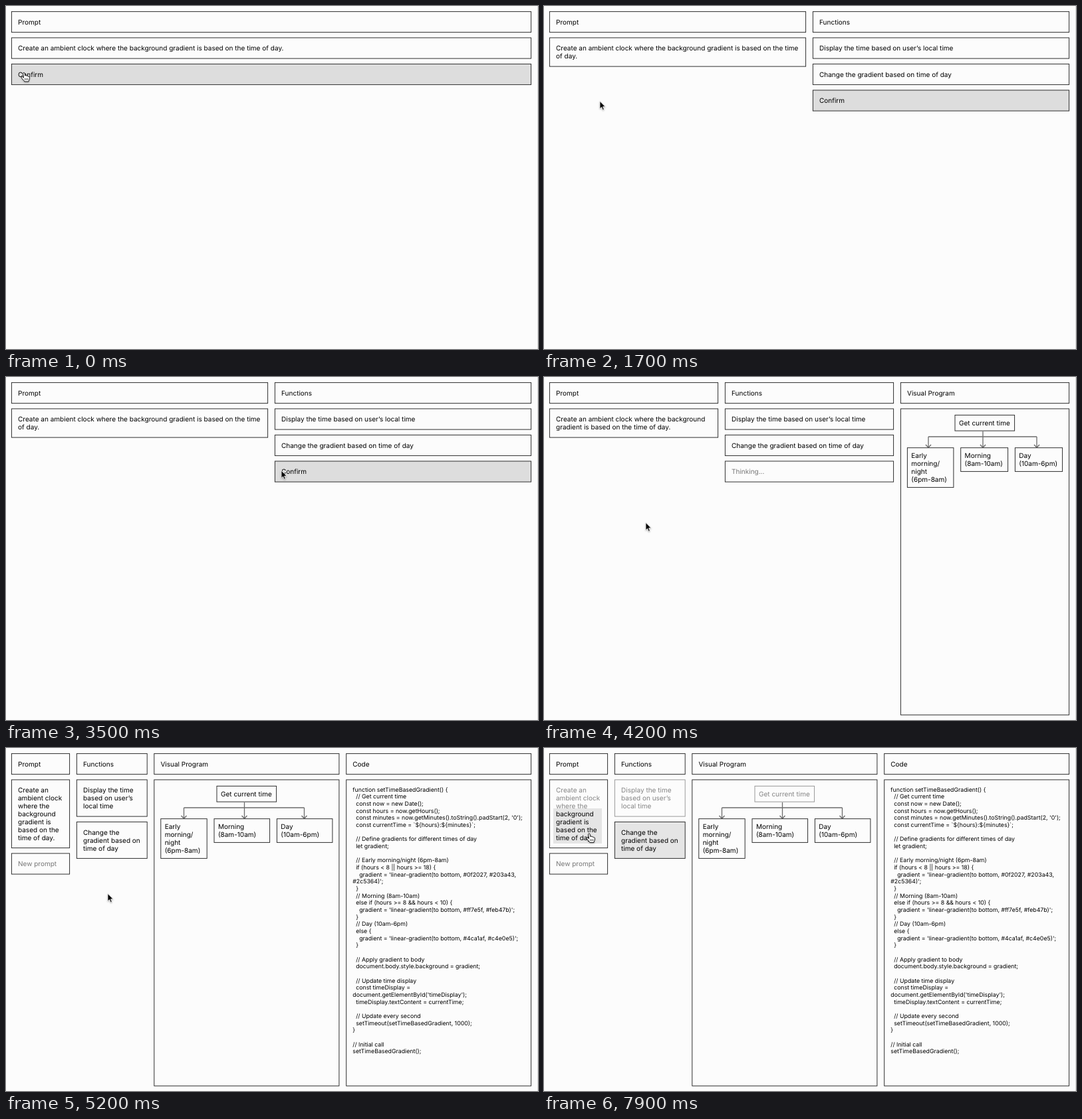
These frames come from a looping animation (800 px wide and 517 px high, 8 s). An HTML page:

```html
<!DOCTYPE html>
<html lang="en">
<head>
<meta charset="utf-8">
<title>Prompt to program</title>
<style>
  html, body { margin: 0; width: 100%; height: 100%; overflow: hidden; background: #fcfcfc; }
  svg { display: block; }
  /* the tiny turn keeps baselines from snapping to whole pixels */
  text { font: 10.03px Inter, "Liberation Sans", sans-serif; fill: #000; white-space: pre; text-rendering: geometricPrecision; transform: rotate(.004deg); }
  rect { fill: #fcfcfc; stroke: #262626; stroke-width: .95; }
  .code text { font-size: 8.77px; }
  .button rect { fill: #ddd; }
  .active rect { fill: #e5e5e5; }
  .hint text { fill: #777; }
  .faded text, text.faded { fill: #858585; }
  .faded rect { stroke: #949494; }
  .mark { fill: #e5e5e5; stroke: none; }
  .link { fill: none; stroke: #6c6c6c; stroke-width: 1.3; }
  #cursor { filter: drop-shadow(0 1px 1px rgba(0, 0, 0, .3)); }
  .edge { fill: #dcdcdc; stroke: none; }
</style>
</head>
<body>
<svg id="stage" width="800" height="517" viewBox="0 0 800 517">
  <rect class="edge" x="799" y="0" width="1" height="517"/>
  <g id="scenes"></g>
  <g id="cursor">
    <path id="arrow" fill="#000" stroke="#fff" stroke-width=".8" d="M0 0V11.4L2.6 9 4.4 13.2 6.3 12.4 4.6 8.3H8.2Z"/>
    <g id="hand" stroke="#000" stroke-width=".9" stroke-linejoin="round">
      <path fill="#fff" d="M-1.4 1.2C-1.4-.4 1-.4 1.2 1.2L1.8 4.6C3 3.8 4 4.2 4.2 5 5.2 4.4 6.2 5 6.4 5.8 7.6 5.4 8.4 6 8.4 7.4 8.6 10 7.4 11 7 13.4H.8C0 11.6-2.6 9.4-3.8 7.6-4.6 6.2-3 5.6-2 6.4L-.4 7.6Z"/>
      <path fill="none" stroke-width=".7" d="M1.6 8.4V11.2M3.6 8.4V11.2M5.6 8.4V11.2"/>
    </g>
  </g>
</svg>
<script>
const LOOP = 8000, STEP = 100;
const INSET = 0.4; // from a box edge to the middle of its line
const $ = id => document.getElementById(id);
const timed = [];

function add(parent, tag, attrs, content) {
  const el = document.createElementNS('http://www.w3.org/2000/svg', tag);
  for (const key in attrs) el.setAttribute(key, attrs[key]);
  if (content) el.textContent = content;
  return parent.appendChild(el);
}

// A group that is visible from start to end
function during(start, end, parent = $('scenes')) {
  const el = add(parent, 'g', {});
  timed.push({ el, start, end });
  return el;
}

function lines(parent, x, middle, content, pitch = 12, size = 10, cls = '') {
  content.split('\n').forEach((line, i) =>
    line && add(parent, 'text', { x, y: middle + i * pitch + size * 0.364, class: cls }, line));
}

function box(parent, left, top, right, bottom, content = '', cls = '', pad = 10, drop = 16) {
  const g = add(parent, 'g', { class: cls });
  add(g, 'rect', {
    x: left + INSET, y: top + INSET,
    width: right - left - 2 * INSET, height: bottom - top - 2 * INSET
  });
  lines(g, left + pad, top + drop, content);
  return g;
}

const row = (g, left, right, top, content, cls) => box(g, left, top, right, top + 32, content, cls);
const header = (g, left, right, title) => row(g, left, right, 8, title);

function functionRows(g, left, right) {
  header(g, left, right, 'Functions');
  row(g, left, right, 47.5, 'Display the time based on user’s local time');
  row(g, left, right, 87, 'Change the gradient based on time of day');
}

// Root box, three branches and the arrows between them; returns a painter for the root
function program(g, left, right, root, branches, tips) {
  header(g, left, right, 'Visual Program');
  box(g, left, 47.5, right, 509.7);
  const heads = tips.map(x => `M${x} 90V106M${x - 4} 102L${x} 106.5 ${x + 4} 102`).join('');
  add(g, 'path', { class: 'link', d: `M${tips[1]} 82V90M${tips[0]} 90H${tips[2]}${heads}` });
  const names = ['Early\nmorning/\nnight\n(6pm-8am)', 'Morning\n(8am-10am)', 'Day\n(10am-6pm)'];
  branches.forEach(([a, b], i) => box(g, a, 106.3, b, i ? 142.8 : 166.8, names[i], '', 6.3, 12.3));
  return (parent, cls) => box(parent, root[0], 57, root[1], 81.5, 'Get current time', cls, 6.4, 12.4);
}

const CODE = `function setTimeBasedGradient() {
  // Get current time
  const now = new Date();
  const hours = now.getHours();
  const minutes = now.getMinutes().toString().padStart(2, '0');
  const currentTime = \`\${hours}:\${minutes}\`;

  // Define gradients for different times of day
  let gradient;

  // Early morning/night (6pm-8am)
  if (hours < 8 || hours >= 18) {
    gradient = 'linear-gradient(to bottom, #0f2027, #203a43,
#2c5364)';
  }
  // Morning (8am-10am)
  else if (hours >= 8 && hours < 10) {
    gradient = 'linear-gradient(to bottom, #ff7e5f, #feb47b)';
  }
  // Day (10am-6pm)
  else {
    gradient = 'linear-gradient(to bottom, #4ca1af, #c4e0e5)';
  }

  // Apply gradient to body
  document.body.style.background = gradient;

  // Update time display
  const timeDisplay =
document.getElementById('timeDisplay');
  timeDisplay.textContent = currentTime;

  // Update every second
  setTimeout(setTimeBasedGradient, 1000);
}

// Initial call
setTimeBasedGradient();`;

// One column
const one = during(0, 1700);
header(one, 8, 790, 'Prompt');
row(one, 8, 790, 47.5, 'Create an ambient clock where the background gradient is based on the time of day.');
row(during(0, 900, one), 8, 790, 87, 'Confirm', 'button');
row(during(900, 1700, one), 8, 790, 87, 'Thinking...', 'hint');

// Two columns
const two = during(1700, 3800);
header(two, 8, 394, 'Prompt');
box(two, 8, 47.5, 394, 91.5, 'Create an ambient clock where the background gradient is based on the time\nof day.');
functionRows(two, 404, 790);
row(during(1700, 3600, two), 404, 790, 126.5, 'Confirm', 'button');
row(during(3600, 3800, two), 404, 790, 126.5, 'Thinking...', 'hint');

// Three columns
const three = during(3800, 4400);
header(three, 8, 262, 'Prompt');
box(three, 8, 47.5, 262, 91.5, 'Create an ambient clock where the background\ngradient is based on the time of day.');
functionRows(three, 272, 526);
row(three, 272, 526, 126.5, 'Thinking...', 'hint');
program(three, 536, 790, [617.6, 708], [[546, 616.3], [626.3, 698], [708, 780]], [578, 660, 741])(three);

// Four columns
const four = during(4400, LOOP);
header(four, 8, 96, 'Prompt');
header(four, 106, 212.6, 'Functions');
const rootBox = program(four, 222.4, 501.3, [316.6, 407], [[232.4, 302.6], [312.6, 397], [407, 491.3]], [267.5, 358.5, 448.5]);
header(four, 511.3, 790, 'Code');
box(four, 511.3, 47.5, 790, 509.7);
lines(add(four, 'g', { class: 'code' }), 521.3, 62.6, CODE, 10.66, 8.75);
box(four, 8, 47.5, 96, 151);
row(during(4400, 5200, four), 106, 212.6, 174.3, 'Thinking...', 'hint');
row(during(5200, LOOP, four), 8, 96, 158.5, 'New prompt', 'hint');

const HEAD = 'Create an\nambient clock\nwhere the';
const TAIL = 'background\ngradient is\nbased on the\ntime of day.';
function details(start, end, hover) {
  const g = during(start, end, four);
  const dim = hover ? 'faded' : '';
  lines(g, 18, 63.5, HEAD, 12, 10, dim);
  if (hover) add(g, 'rect', { class: 'mark', x: 14, y: 91, width: 73, height: 53 });
  lines(g, 18, 99.5, TAIL);
  box(g, 106, 47.5, 212.6, 103.5, 'Display the time\nbased on user’s\nlocal time', dim);
  box(g, 106, 111, 212.6, 166.8, 'Change the\ngradient based on\ntime of day', hover ? 'active' : '');
  rootBox(g, dim);
}
details(4400, 7700, false);
details(7700, LOOP, true);

// Pointer tip: time, x, y
const path = [
  [0, 27, 100.5], [1100, 27, 100.5], [1500, 84, 143.5],
  [2100, 84, 143.5], [2900, 426, 144], [3000, 426, 144], [3400, 414, 141],
  [3500, 414, 141], [3900, 152, 219], [4000, 153, 220], [4200, 153, 219.5],
  [6200, 153, 219.5], [6500, 120, 190], [6700, 120, 190], [6900, 99, 168.5],
  [7600, 71, 131], [7900, 68, 129], [LOOP, 68, 129]
];
const handTimes = [[0, 100], [2900, 3400], [7700, LOOP]];

function tip(t) {
  const i = path.findIndex(p => p[0] > t);
  const [t0, x0, y0] = path[i - 1], [t1, x1, y1] = path[i];
  const k = (t - t0) / (t1 - t0), e = k * k * (3 - 2 * k);
  return [x0 + (x1 - x0) * e, y0 + (y1 - y0) * e];
}

function render(now) {
  const t = Math.floor(now % LOOP / STEP) * STEP;
  for (const { el, start, end } of timed) el.style.display = t >= start && t < end ? '' : 'none';
  const onHand = handTimes.some(([a, b]) => t >= a && t < b);
  $('hand').style.display = onHand ? '' : 'none';
  $('arrow').style.display = onHand ? 'none' : '';
  $('cursor').setAttribute('transform', `translate(${tip(t)})`);
}

const began = performance.now();
function tick() {
  render(performance.now() - began);
  requestAnimationFrame(tick);
}
tick();
</script>
</body>
</html>
```
